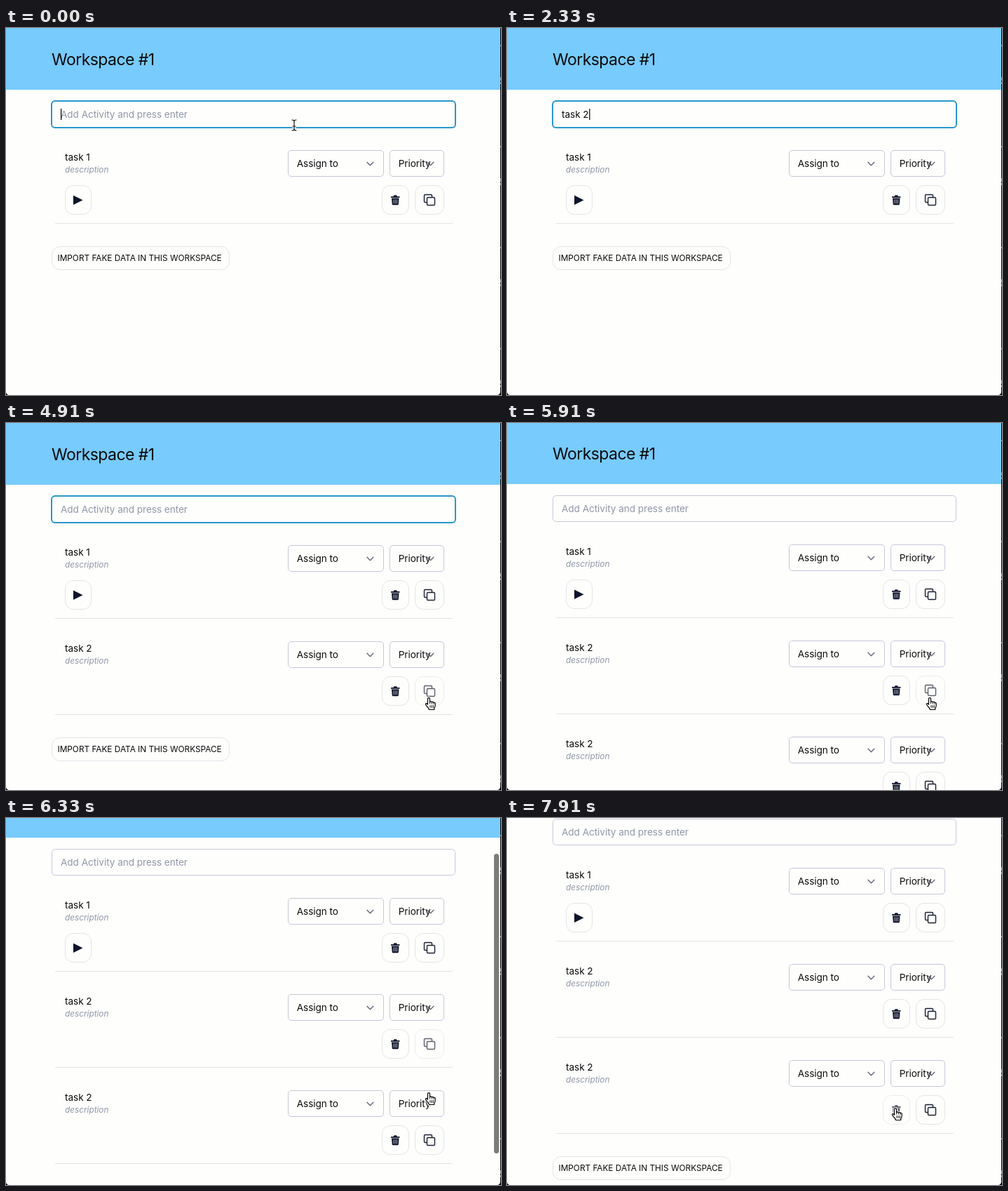
These frames come from a looping animation (706 by 523 pixels, 8 s). An HTML page:

```html
<!DOCTYPE html>
<html lang="en">
<head>
<meta charset="utf-8">
<title>Workspace</title>
<style>
  html, body { margin: 0; width: 100%; height: 100%; overflow: hidden; background: #000; }
  svg { display: block; width: 706px; height: 523px; font-family: Inter, "Liberation Sans", sans-serif; }
  text { white-space: pre; fill: #0a0a0c; font-size: 13.6px; letter-spacing: -.05px; }
  .title { font-size: 23px; letter-spacing: -.55px; }
  .muted { fill: #9096a8; }
  .small { font-size: 11.8px; letter-spacing: 0; }
  .note { font-size: 11.8px; letter-spacing: 0; font-style: italic; }
  .box { fill: #fefefc; stroke: #c6c7da; }
  .button { fill: #fefefc; stroke: #e3e5ea; }
  .chevron { fill: none; stroke: #6b7080; stroke-width: 1.6; stroke-linecap: round; stroke-linejoin: round; }
  .ink { fill: #10142a; }
  .outline { fill: none; stroke: #1b1f33; stroke-width: 1.4; stroke-linejoin: round; }
  .hover { opacity: .7; }
</style>
</head>
<body>
<svg viewBox="0 0 706 523">
  <defs>
    <clipPath id="window"><rect y="-3" width="705" height="526" rx="4.5"/></clipPath>
  </defs>
  <rect width="706" height="523"/>
  <path d="M705.6 24V523" stroke="#aaa" stroke-width=".8" stroke-dasharray="2 44 5 2 3 88"/>
  <g clip-path="url(#window)">
    <rect width="706" height="523" fill="#fefefc"/>
    <g id="page">
      <rect width="706" height="88" fill="#77cbfd"/>
      <text class="title" x="65" y="53">Workspace #1</text>
      <rect id="field" class="box"/>
      <text id="entry" x="78" y="128"></text>
      <rect id="caret" y="115" width="1.2" height="16"/>
      <g id="rows"></g>
      <g id="import">
        <rect class="button" x="65.5" y="311.5" width="253" height="33" rx="11.5"/>
        <text class="small" x="73.5" y="332">IMPORT FAKE DATA IN THIS WORKSPACE</text>
      </g>
    </g>
    <rect id="thumb" x="696" width="7" height="427" rx="3.5" fill="#7c7c7c"/>
  </g>
  <g id="beam" fill="none" stroke-linecap="round">
    <path id="beamShape" d="M-3 -7Q0 -7 0 -5Q0 -7 3 -7M0 -5V6M-3 8Q0 8 0 6Q0 8 3 8M-2 2H2" stroke="#fff" stroke-width="3"/>
    <use href="#beamShape"/>
    <path d="M-3 -7Q0 -7 0 -5Q0 -7 3 -7M0 -5V6M-3 8Q0 8 0 6Q0 8 3 8M-2 2H2" stroke="#111" stroke-width="1.2"/>
  </g>
  <path id="arrow" d="M0 0V15L3.5 11.8L5.8 17L8.2 16L6 11H10.8Z" fill="#000" stroke="#fff" stroke-width="1.2" stroke-linejoin="round"/>
  <g id="hand" stroke-linejoin="round" stroke-linecap="round">
    <path d="M-1.5 9V1.6A1.5 1.5 0 0 1 1.5 1.6V6Q3 4.9 4.3 6.2Q6 5.4 7 6.8Q9 6.5 9.2 8.3V11Q9 13.5 7.7 15V17H.5Q-.2 14.5 -2.5 12.5Q-4.9 9.8 -4.6 8.6Q-3.5 7.3 -1.5 9.5Z" fill="#fff" stroke="#fff" stroke-width="3"/>
    <path d="M-1.5 9V1.6A1.5 1.5 0 0 1 1.5 1.6V6Q3 4.9 4.3 6.2Q6 5.4 7 6.8Q9 6.5 9.2 8.3V11Q9 13.5 7.7 15V17H.5Q-.2 14.5 -2.5 12.5Q-4.9 9.8 -4.6 8.6Q-3.5 7.3 -1.5 9.5Z" fill="#fff" stroke="#000" stroke-width="1.2"/>
    <path d="M1.5 6V8.5M4.3 6.3V8.7M7 7V9M2 11V14M4.2 11V14M6.4 11V14" fill="none" stroke="#000" stroke-width=".9"/>
  </g>
</svg>
<script>
const LOOP = 8000, ROW = 137;
const $ = id => document.getElementById(id);
const set = (el, attrs) => { for (const k in attrs) el.setAttribute(k, attrs[k]); };
const show = (el, on) => el.setAttribute('visibility', on ? 'visible' : 'hidden');
const move = (el, x, y) => el.setAttribute('transform', `translate(${x} ${y})`);

// Latest value whose start time has passed.
const at = (track, t) => track.filter(([start]) => start <= t).pop()[1];

const select = (x, width, label) => `
  <rect class="box" x="${x}" y="174.5" width="${width}" height="37" rx="4.5"/>
  <path class="chevron" d="M${x + width - 23.5} 191.3l4.4 4.4l4.4 -4.4"/>
  <text x="${x + 12.2}" y="198">${label}</text>`;

const button = (name, x, width, icon) => `
  <g class="${name}">
    <rect class="button" x="${x}" y="224.5" width="${width}" height="41" rx="11.5"/>${icon}
  </g>`;

const play = button('play', 84.5, 37, '<path class="ink" d="M96 238.5L109.5 245.2L96 252Z"/>');
const trash = button('trash', 536.5, 38, `
  <path class="ink" d="M549 240h3.5l1 -1.8h3.5l1 1.8h3.5v1.7h-12.5zM550 242.5h10.5l-.7 8.5q-.1 1.2 -1.3 1.2h-6.5q-1.2 0 -1.3 -1.2z"/>
  <path d="M553 244.3v6M555.3 244.3v6M557.6 244.3v6" stroke="#d5d7dd" stroke-width=".8"/>`);
const copy = button('copy', 583.5, 41, `
  <path class="outline" d="M600.5 248.5h-2.7q-1.3 0 -1.3 -1.3v-8.4q0 -1.3 1.3 -1.3h8.4q1.3 0 1.3 1.3v2.7"/>
  <rect class="outline" x="600.5" y="241.5" width="11" height="11" rx="1.3"/>`);

$('rows').innerHTML = ['task 1', 'task 2', 'task 2'].map((name, i) => `
  <g transform="translate(0 ${i * ROW})">
    <text x="84" y="189">${name}</text>
    <text class="note muted" x="84" y="206">description</text>
    ${select(402.5, 136, 'Assign to')}${select(547.5, 77, 'Priority')}
    ${i ? '' : play}${trash}${copy}
    <path d="M70 278.5H637" stroke="#e2e4e8"/>
  </g>`).join('');
const rows = [...$('rows').children];

const typed = [[0, ''], [210, 't'], [380, 'ta'], [540, 'tas'], [740, 'task'], [910, 'task '], [1330, 'task 2'], [2540, '']];
const caretX = [[0, 78], [210, 82.5], [380, 90], [540, 97], [740, 104.5], [910, 108.5], [1330, 117.2], [2540, 78]];
const caretOn = [[0, 1], [1700, 0], [2330, 1], [3120, 0], [3700, 1], [4330, 0]];
const rowCount = [[0, 1], [2540, 2], [5330, 3]];
const scrollTop = [[0, 0], [5910, 1], [6120, 24], [6330, 60], [6500, 86], [6700, 102], [6910, 103]];
const thumbAlpha = [[0, 0], [6120, 1], [7290, .6], [7500, .2], [7700, 0]];
const hovered = [[0, ''], [4500, '1 copy'], [7120, ''], [7700, '2 trash']];
const pointer = [
  [0, ['beam', 411, 138]], [210, ['', 0, 0]],
  [3500, ['arrow', 418, 160]], [3700, ['arrow', 500, 245]], [3910, ['arrow', 590, 345]],
  [4120, ['arrow', 634, 418]], [4330, ['hand', 614, 400]], [4500, ['hand', 603, 391.5]],
  [7120, ['hand', 597, 396]], [7290, ['hand', 588, 402]], [7500, ['arrow', 576, 408]],
  [7700, ['hand', 561, 411]], [7910, ['hand', 554, 413.5]]
];

function render(t) {
  const focused = t < 5120, text = at(typed, t), count = at(rowCount, t), scroll = at(scrollTop, t);
  move($('page'), 0, -scroll);
  move($('import'), 0, (count - 1) * ROW);

  const inset = focused ? 0 : .5;
  set($('field'), {
    x: 65 + inset, y: 104 + inset, width: 576 - 2 * inset, height: 38 - 2 * inset, rx: 4.8,
    style: focused ? 'stroke:#2a97cd;stroke-width:2' : ''
  });
  $('entry').textContent = text || 'Add Activity and press enter';
  $('entry').setAttribute('class', text ? '' : 'muted');
  $('caret').setAttribute('x', at(caretX, t));
  show($('caret'), focused && at(caretOn, t));

  rows.forEach((row, i) => {
    row.style.display = i < count ? '' : 'none';
    for (const name of ['trash', 'copy'])
      row.querySelector('.' + name).classList.toggle('hover', at(hovered, t) === `${i} ${name}`);
  });

  set($('thumb'), { y: 2 + scroll * .815, opacity: at(thumbAlpha, t) });

  const [kind, x, y] = at(pointer, t);
  for (const id of ['beam', 'arrow', 'hand']) {
    show($(id), id === kind);
    move($(id), x, y);
  }
}

const start = performance.now();
function tick() {
  render((performance.now() - start) % LOOP);
  requestAnimationFrame(tick);
}
tick();
</script>
</body>
</html>
```
